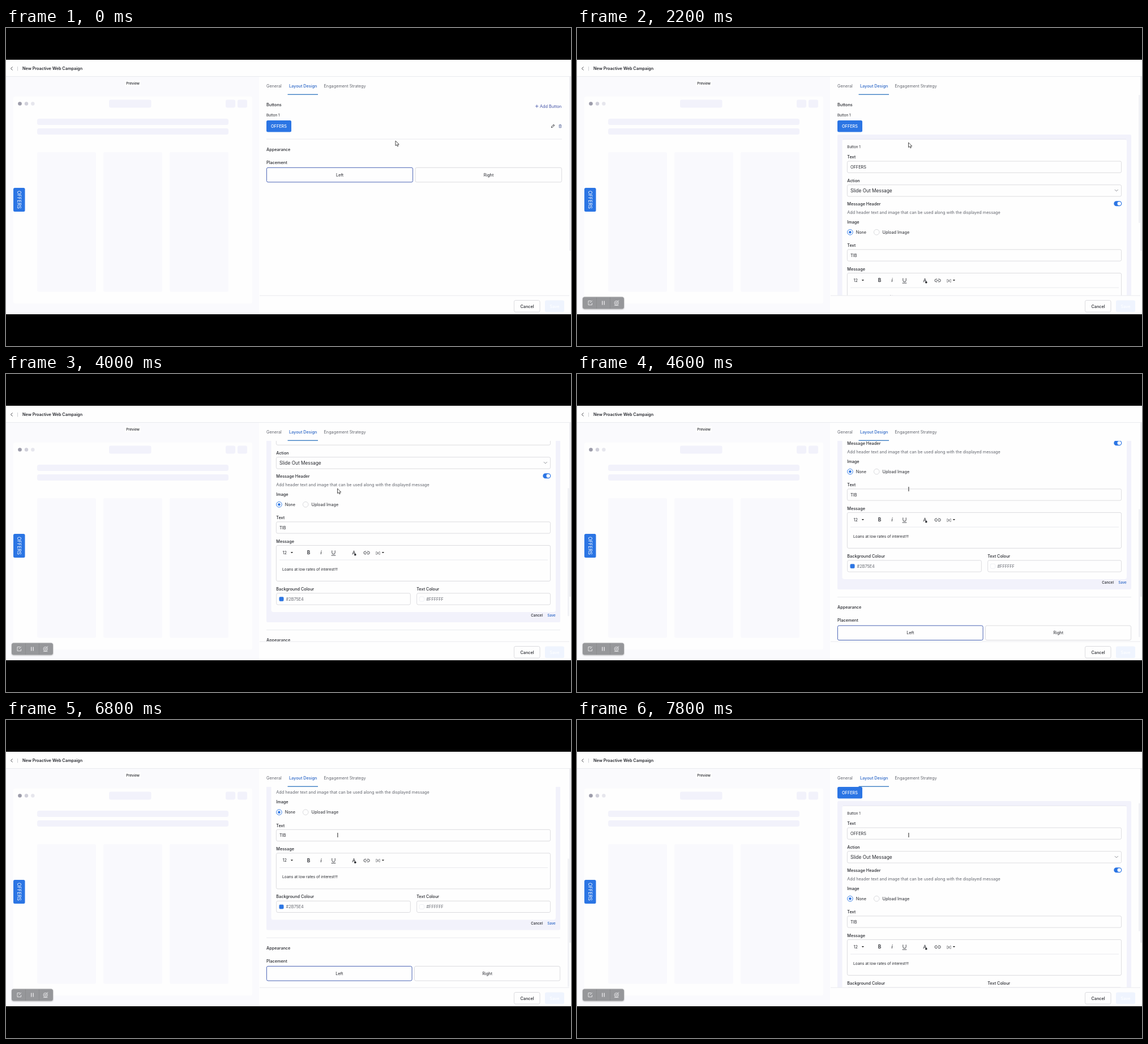
These frames come from a looping animation (998 by 561 pixels, 8000 ms). An HTML page:

```html
<!DOCTYPE html>
<html lang="en">
<head>
<meta charset="utf-8">
<title>Campaign layout editor</title>
<style>
@property --scroll { syntax: "<length>"; inherits: true; initial-value: 0px; }
@property --x { syntax: "<length>"; inherits: true; initial-value: 688px; }
@property --y { syntax: "<length>"; inherits: true; initial-value: 199px; }
html, body { margin: 0; width: 100%; height: 100%; overflow: hidden; background: #000; }
svg { display: block; width: 998px; height: 561px; animation: scroll 8s step-end infinite; }
text { font-family: Inter, sans-serif; font-size: 7.28px; fill: #25272d; white-space: pre; }
.medium { font-weight: 500; }
.bold { font-weight: 600; }
.small { font-size: 6.24px; }
.note { font-size: 6.76px; }
.large { font-size: 8.32px; }
.mid { text-anchor: middle; }
.muted { fill: #62656d; }
.blue { fill: #2b66c6; }
.indigo { fill: #4151a6; }
.white { fill: #fff; }
.field { fill: #fefefe; stroke: #d3d4d8; stroke-width: .8; }
.line { fill: none; stroke: #33353a; stroke-width: .9; }
.rule { stroke: #e9eaee; stroke-width: 1; }
#list { transform: translateY(calc(var(--scroll) * -1)); }
#thumb { transform: translateY(calc(var(--scroll) * .64)); }
#cursor { transform: translate(var(--x), var(--y)); animation: move 8s step-end infinite; }
#closed { animation: until-open 8s step-end infinite; }
.open { animation: after-open 8s step-end infinite; }
#recorder { animation: recorder 8s step-end infinite; }
#arrow { animation: arrow 8s step-end infinite; }
#beam { animation: beam 8s step-end infinite; }
@keyframes scroll {
  0% { --scroll: 0px; }
  35% { --scroll: 32px; }
  37.5% { --scroll: 65px; }
  45% { --scroll: 84px; }
  47.5% { --scroll: 126px; }
  50% { --scroll: 130px; }
  55% { --scroll: 148px; }
  57.5% { --scroll: 188px; }
  60%, 62.5% { --scroll: 195px; }
  67.5% { --scroll: 195.5px; }
  70%, 85% { --scroll: 197.5px; }
  87.5% { --scroll: 174px; }
  90% { --scroll: 134px; }
  92.5% { --scroll: 108px; }
  95% { --scroll: 68px; }
  97.5%, 100% { --scroll: 45px; }
}
@keyframes move {
  0% { --x: 688px; --y: 199px; }
  2.5% { --x: 704px; --y: 197px; }
  5% { --x: 782px; --y: 189px; }
  7.5% { --x: 882px; --y: 180px; }
  10% { --x: 946px; --y: 174px; }
  12.5%, 20% { --x: 965px; --y: 173px; }
  22.5% { --x: 800px; --y: 196px; }
  25% { --x: 620px; --y: 203px; }
  27.5%, 100% { --x: 585.5px; --y: 202px; }
}
@keyframes until-open { 0% { visibility: visible; } 20%, 100% { visibility: hidden; } }
@keyframes after-open { 0% { visibility: hidden; } 20%, 100% { visibility: visible; } }
@keyframes recorder { 0% { visibility: hidden; } 5%, 100% { visibility: visible; } }
@keyframes arrow { 0% { visibility: visible; } 57.5%, 100% { visibility: hidden; } }
@keyframes beam { 0% { visibility: hidden; } 57.5%, 100% { visibility: visible; } }
</style>
</head>
<body>
<svg id="stage" viewBox="0 0 998 561"></svg>
<script>
// Text is placed by the vertical middle of its capitals.
const text = (x, cy, value, style = "") =>
  `<text x="${x}" y="${cy + 2.6}" class="${style}">${value}</text>`;
const rect = (x, y, w, h, fill, r = 0) =>
  `<rect x="${x}" y="${y}" width="${w}" height="${h}" rx="${r}" fill="${fill}"/>`;
const field = (x, y, w, h, extra = "") =>
  `<rect class="field" x="${x}" y="${y}" width="${w}" height="${h}" rx="2.5" ${extra}/>`;
const rule = (x1, x2, y) => `<path class="rule" d="M${x1} ${y}H${x2}"/>`;
const dot = (x, y, r, fill, extra = "") =>
  `<circle cx="${x}" cy="${y}" r="${r}" fill="${fill}" ${extra}/>`;
const path = (d, extra = 'class="line"') => `<path d="${d}" ${extra}/>`;
const at = (x, y, content) => `<g transform="translate(${x} ${y})">${content}</g>`;

const BLUE = "#2b75e4", PAGE = "#fefefe", TINT = "#f2f2fb";

const preview = () => [
  rect(0, 85, 447, 420, "#fafafd"),
  rect(210, 92, 28, 11, PAGE),
  text(224, 97.5, "Preview", "small medium mid"),
  rect(13, 121, 422, 365, PAGE, 3),
  dot(24.5, 133.5, 3.3, "#9c9caa"),
  dot(36, 133.5, 3.2, "#cfcfd9"),
  dot(47.3, 133.5, 3.2, "#e6e6ed"),
  rect(182, 126.5, 74.5, 14, TINT, 3),
  rect(388, 126.5, 17, 14, TINT, 3),
  rect(409, 126.5, 17, 14, TINT, 3),
  rect(55, 160, 338, 11, TINT, 3.5),
  rect(55, 177, 338, 11, TINT, 3.5),
  ...[55, 172, 289].map(x => rect(x, 219, 104, 246.5, "#f9f9fd", 3)),
  rect(13, 282, 20.5, 42, BLUE, 2.5),
  `<g transform="translate(23.3 303) rotate(90)">${text(0, .4, "OFFERS", "large mid white")}</g>`,
].join("");

const header = () => [
  rect(0, 56, 998, 29, PAGE),
  rule(0, 998, 85.5),
  path("M11.5 68.5L8.5 71.5 11.5 74.5"),
  path("M20.5 68V75.5", 'stroke="#c5c6cb" stroke-width=".8"'),
  text(29, 71.5, "New Proactive Web Campaign", "bold"),
].join("");

const tabs = () => [
  text(460, 102, "General", "muted"),
  text(500, 102, "Layout Design", "medium blue"),
  text(561.5, 102, "Engagement Strategy", "muted"),
  rect(497.5, 116.6, 53.5, 1.4, "#3f7fc4"),
].join("");

const footer = () => [
  rect(448, 472, 550, 33, PAGE),
  rule(448, 995, 472),
  field(897.5, 480.5, 45.5, 20.5),
  text(920.5, 491, "Cancel", "medium mid"),
  rect(952, 480.5, 34, 20.5, "#eff4fe", 2.5),
  text(969, 491, "Save", "medium mid white"),
].join("");

// Appearance block, "top" being its divider.
const appearance = (top, width) => {
  const half = (width - 4) / 2, right = 460 + half + 4;
  return [
    rule(460, 460 + width, top),
    text(460, top + 18, "Appearance", "medium"),
    text(460, top + 41, "Placement", "medium"),
    field(460.4, top + 50.3, half - .8, 25.6, 'style="stroke:#4a64b5;stroke-width:1"'),
    field(right, top + 50.3, half - .4, 25.6),
    text(460 + half / 2, top + 63, "Left", "mid"),
    text(right + half / 2, top + 63, "Right", "mid"),
  ].join("");
};

const closedList = () => [
  path("M935 138H940.4M937.7 135.3V140.7", 'stroke="#4151a6" stroke-width=".8"'),
  text(943, 138, "Add Button", "indigo"),
  path("M963.3 175.7L963.8 173.7 967.3 170.2 968.8 171.7 965.3 175.2ZM966.5 171L968 172.5"),
  path("M976.6 171.2H981.2M977.2 171.2V175.8H980.6V171.2M978 170.2H979.8M978.9 172.4V174.6",
    'fill="none" stroke="#5b6a9e" stroke-width=".8"'),
  appearance(196, 522),
].join("");

const radio = (x, label, on) =>
  dot(x, 360.2, 4.8, PAGE, `stroke="${on ? BLUE : "#d5d6da"}" stroke-width=".9"`) +
  (on ? dot(x, 360.2, 2.2, BLUE) : "") +
  text(x + 10.3, 360, label);

const caret = x => path(`M${x} 444H${x + 4.2}L${x + 2.1} 446.3Z`, 'fill="#222"');

const editor = () => [
  field(477.4, 432.4, 484.2, 63),
  text(488.5, 445, "12"),
  caret(502.8),
  text(531.8, 445.6, "B", "large bold"),
  `<text x="555.4" y="448.4" class="large medium" font-style="italic">i</text>`,
  path("M575.8 441.4V445.2A2.7 2.7 0 0 0 581.2 445.2V441.4M574.6 450H582.3"),
  path("M611.9 448.4L614.5 441.8 617.1 448.4M612.8 446H616.2"),
  dot(616.8, 448.8, 1.8, "#26282c"),
  path("M636.2 443H634.4A2.4 2.4 0 0 0 634.4 447.8H636.2M638 443H639.8A2.4 2.4 0 0 1 639.8 447.8H638M634.8 445.4H639.4"),
  text(653, 445, "[x]", "small"),
  caret(663.8),
  rule(483, 957, 458),
  text(488, 474.2, "Loans at low rates of interest!!!", "note"),
].join("");

const colourField = (x, w, label, value, fill) => [
  text(x, 509.3, label, "medium"),
  field(x + .4, 516.8, w - .8, 20.2),
  `<rect x="${x + 5}" y="523" width="8.4" height="8" rx="2.2" fill="${fill}" stroke="#dde0e8" stroke-width=".5"/>`,
  text(x + 17.3, 527.2, value, "muted"),
].join("");

const openList = () => [
  rect(460, 188, 519, 380, TINT, 2),
  rect(468.5, 196, 502.5, 354, PAGE, 4),
  path("M470 196.3H970", 'stroke="#dfe0ea" stroke-width=".7"'),
  text(477.3, 209, "Button 1", "small"),
  text(477.3, 227.6, "Text", "medium"),
  field(477.4, 235, 484.2, 20.3),
  text(483, 245.2, "OFFERS"),
  text(477.3, 269.2, "Action", "medium"),
  field(477.4, 276.7, 484.2, 20.4),
  text(483, 287.1, "Slide Out Message", "large"),
  path("M949.8 285L952.8 288 955.8 285", 'fill="none" stroke="#777a82" stroke-width=".8"'),
  text(477.3, 310.6, "Message Header", "medium"),
  rect(948.3, 305.3, 14, 9, BLUE, 4.5),
  dot(957.8, 309.8, 3.3, "#fff"),
  text(477.3, 325.3, "Add header text and image that can be used along with the displayed message", "muted"),
  text(477.3, 342, "Image", "medium"),
  radio(482.4, "None", true),
  radio(529.2, "Upload Image", false),
  text(477.3, 383.5, "Text", "medium"),
  field(477.4, 390.8, 484.2, 20.3),
  text(483, 401.2, "TIB"),
  text(477.3, 425, "Message", "medium"),
  editor(),
  colourField(477.3, 237.5, "Background Colour", "#2B75E4", BLUE),
  colourField(725.2, 236.8, "Text Colour", "#FFFFFF", "#fff"),
  text(927.3, 555.5, "Cancel", "small medium"),
  text(956.2, 555.5, "Save", "small medium blue"),
  appearance(581.6, 519),
].join("");

const list = () => `<g clip-path="url(#viewport)"><g id="list">
  ${text(460, 135.6, "Buttons", "medium")}
  ${text(460, 153.6, "Button 1", "small")}
  ${rect(460, 163, 44, 20.5, BLUE, 2.5)}
  ${text(482, 173.2, "OFFERS", "medium mid white")}
  <g id="closed">${closedList()}</g>
  <g class="open">${openList()}</g>
</g></g>`;

const recorder = () => `<g id="recorder">
  <rect x="10" y="474.5" width="73" height="21" rx="3.5" fill="#96979a" filter="url(#shadow)"/>
  ${path("M34.5 475V495M58.5 475V495", 'stroke="#88898c" stroke-width=".8"')}
  <g fill="none" stroke="#e4e4e6" stroke-width="1">
    ${path("M25 481.5H20V488.5H26.5V485M22.5 485.5L27 481", "")}
    ${path("M44.7 481.5V488.5M48.2 481.5V488.5", 'stroke-width="1.4"')}
    ${at(69.7, 485, dot(0, 0, 3.6, "none") + dot(0, 0, 1.4, "none") + path("M-3.8 4.3H3.8M1.5 -2L4.5 -4.5", ""))}
  </g></g>`;

const cursor = () => `<g id="cursor">
  ${path("M0 0V8.6L2 6.9 3.4 9.8 4.9 9.1 3.6 6.3H6.2Z",
    'id="arrow" fill="#fff" stroke="#222" stroke-width=".8" stroke-linejoin="round"')}
  ${path("M.4 -3V5", 'id="beam" stroke="#222" stroke-width="1"')}
</g>`;

document.getElementById("stage").innerHTML = `<defs>
  <clipPath id="viewport">${rect(448, 118, 550, 354, "#000")}</clipPath>
  <filter id="shadow" x="-10%" y="-30%" width="120%" height="160%">
    <feDropShadow dx="0" dy=".6" stdDeviation="1.2" flood-color="#000" flood-opacity=".35"/>
  </filter></defs>` + [
  rect(0, 56, 998, 449, PAGE),
  preview(),
  header(),
  list(),
  tabs(),
  footer(),
  rect(995, 86, 3, 307, "#ededf1", 1),
  `<g class="open"><g id="thumb">${rect(992, 118, 3, 226, "#f1f2f5", 1)}</g></g>`,
  recorder(),
  cursor(),
].join("");
</script>
</body>
</html>
```
